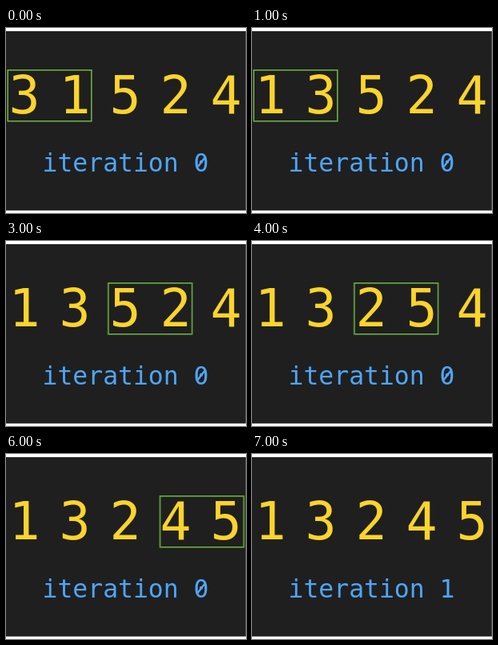
Write an HTML page that moves like this. It is 300x232 px and loops after 8 s.

```html
<!DOCTYPE html>
<html lang="en">
<head>
<meta charset="utf-8">
<title>Bubble sort</title>
<style>
  html, body { margin: 0; width: 100%; height: 100%; overflow: hidden; background: #fff; }
  svg { display: block; width: 100vw; height: 100vh; }
  text { font-family: "DejaVu Sans Mono", monospace; text-anchor: middle; }
  .digits { font-size: 65px; fill: #fbd42c; }
  .label { font-size: 31.4px; fill: #4fa6f8; }
  .slash { stroke: #4fa6f8; stroke-width: 2.4; }
  .pair { fill: none; stroke: #68b13f; stroke-width: 1.6; }

  svg * {
    animation-duration: 8s;
    animation-timing-function: step-end;
    animation-iteration-count: infinite;
  }
  .three { animation-name: three; }
  .one { animation-name: one; }
  .five { animation-name: five; }
  .two { animation-name: two; }
  .four { animation-name: four; }
  .pair { animation-name: pair; }
  .before { animation-name: before; }
  .after { animation-name: after; }

  /* One slot is 63px wide, one step lasts 12.5%. */
  @keyframes three { 0% { transform: none; } 12.5%, 100% { transform: translateX(63px); } }
  @keyframes one { 0% { transform: none; } 12.5%, 100% { transform: translateX(-63px); } }
  @keyframes five {
    0% { transform: none; }
    50% { transform: translateX(63px); }
    75%, 100% { transform: translateX(126px); }
  }
  @keyframes two { 0% { transform: none; } 50%, 100% { transform: translateX(-63px); } }
  @keyframes four { 0% { transform: none; } 75%, 100% { transform: translateX(-63px); } }
  @keyframes pair {
    0% { transform: none; visibility: visible; }
    25% { transform: translateX(63px); visibility: visible; }
    37.5% { transform: translateX(125.7px); visibility: visible; }
    62.5% { transform: translateX(190.4px); visibility: visible; }
    87.5%, 100% { transform: translateX(190.4px); visibility: hidden; }
  }
  @keyframes before { 0% { visibility: visible; } 87.5%, 100% { visibility: hidden; } }
  @keyframes after { 0% { visibility: hidden; } 87.5%, 100% { visibility: visible; } }
</style>
</head>
<body>
<svg viewBox="0 0 300 232" preserveAspectRatio="none">
  <rect y="4" width="299.8" height="224.8" fill="#1f1f1f"/>
  <g class="digits">
    <text class="three" x="23" y="107">3</text>
    <text class="one" x="86" y="107">1</text>
    <text class="five" x="149" y="107">5</text>
    <text class="two" x="212" y="107">2</text>
    <text class="four" x="275" y="107">4</text>
  </g>
  <rect class="pair" x="2.2" y="52.8" width="104.6" height="64"/>
  <g class="label">
    <text class="before" x="149.5" y="180">iteration 0</text>
    <text class="after" x="149.5" y="180">iteration 1</text>
  </g>
  <path class="slash before" d="M239.8 174L248.2 163"/>
</svg>
</body>
</html>
```
